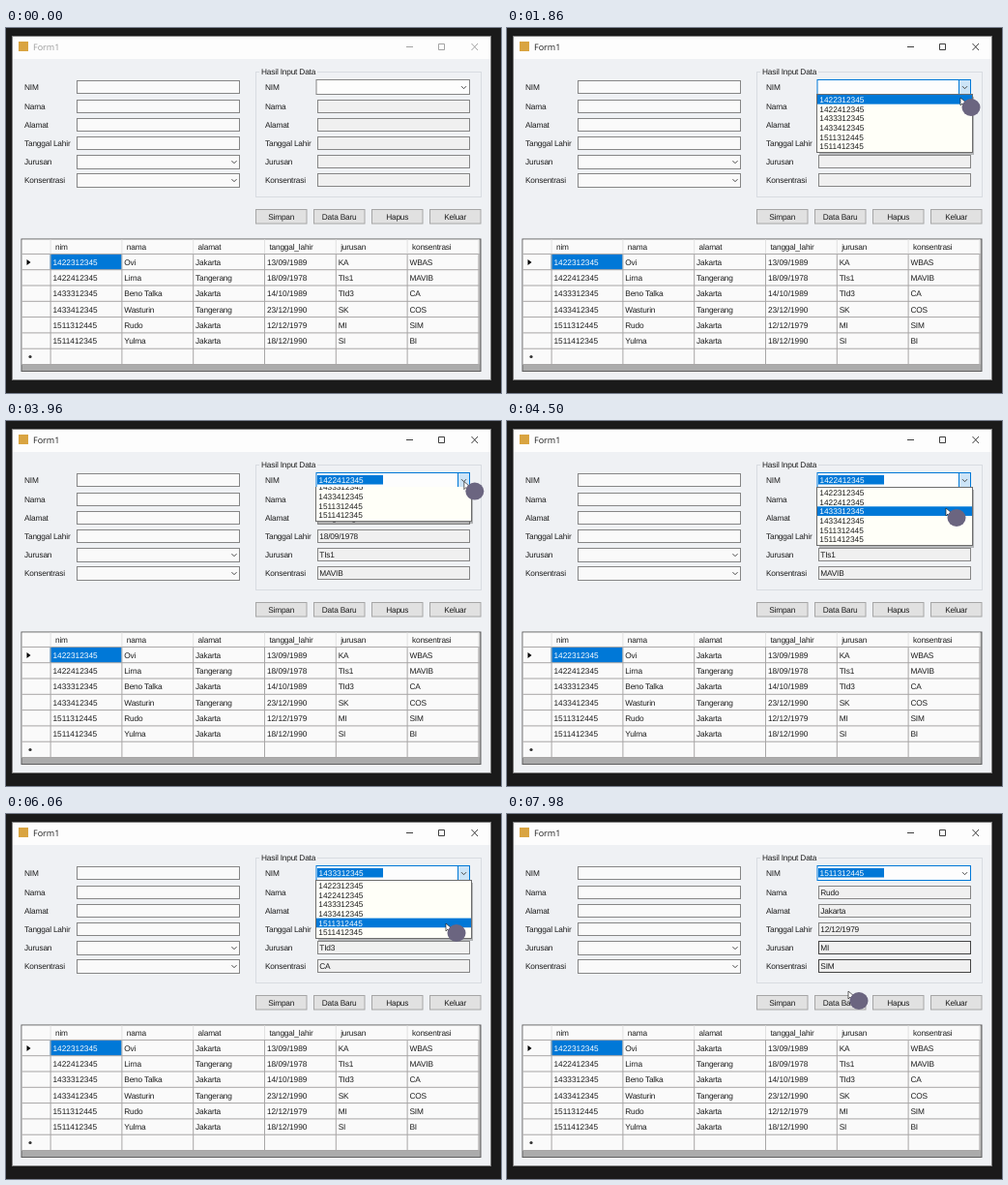
An HTML page for the animation above (8000 ms loop, 512x377 px).

```html
<!DOCTYPE html>
<html lang="id">
<head>
<meta charset="utf-8">
<title>Form1</title>
<style>
html, body { margin: 0; width: 100%; height: 100%; overflow: hidden; background: #1a1a1a; }
svg { display: block; width: 100%; height: 100%; }
text { font: 8.3px "Liberation Sans", Arial, sans-serif; fill: #1c1c1c; text-rendering: geometricPrecision; white-space: pre; }
.word { letter-spacing: -.18px; }
.title { font: 9px "Open Sans", "Noto Sans", sans-serif; }
.mid { text-anchor: middle; }
.line { fill: none; stroke: #444; }
.light { fill: #fff; }
#chrome { stroke: #2a2a2a; stroke-width: .9; fill: none; }
.idle #chrome { stroke: #999; }
.idle .title { fill: #999; }
</style>
</head>
<body>
<svg id="stage" viewBox="0 0 512 377" preserveAspectRatio="none"></svg>
<script>
const LOOP = 8000, TICK = 60;
const labels = ['NIM', 'Nama', 'Alamat', 'Tanggal Lahir', 'Jurusan', 'Konsentrasi'];
const heads = ['nim', 'nama', 'alamat', 'tanggal_lahir', 'jurusan', 'konsentrasi'];
const people = [
  ['1422312345', 'Ovi', 'Jakarta', '13/09/1989', 'KA', 'WBAS'],
  ['1422412345', 'Lirna', 'Tangerang', '18/09/1978', 'TIs1', 'MAVIB'],
  ['1433312345', 'Beno Talka', 'Jakarta', '14/10/1989', 'TId3', 'CA'],
  ['1433412345', 'Wasturin', 'Tangerang', '23/12/1990', 'SK', 'COS'],
  ['1511312445', 'Rudo', 'Jakarta', '12/12/1979', 'MI', 'SIM'],
  ['1511412345', 'Yulma', 'Jakarta', '18/12/1990', 'SI', 'BI']
];
const fieldY = [54, 74, 93, 112, 131, 150];
const colX = i => 45.6 + i * 73.8;
const rowY = i => 233.4 + i * 16.3;
const EDGE = '#868686', BLUE = '#0078d7', GRID = '#a8a6a6';
const LIST_TOP = 69, ITEM = 9.65, LIST_H = 60, OPEN_MS = 205;

// pointer tip: time, x, y
const path = [
  [180, 484, 26], [480, 312, 50], [840, 468, 61], [1020, 468, 61], [1320, 473, 62],
  [1620, 474, 63], [1800, 469, 72], [2220, 469, 72], [2520, 474, 61], [2760, 474, 61],
  [3120, 460, 83], [3240, 459, 84], [3420, 459, 84], [3720, 475, 61], [3900, 475, 61],
  [4320, 454, 90], [4560, 454, 90], [5100, 476, 62], [5600, 476, 62], [5880, 455, 113],
  [6060, 455, 113], [6360, 302, 80], [6720, 451, 101], [6840, 448, 104], [6900, 448, 104],
  [7260, 273, 120], [7560, 350, 150], [7680, 345, 150], [7980, 353, 183]
];
const opens = [[1440, 2280], [2700, 3480], [3840, 4560], [5400, 6120]];
const picks = [[2280, 0], [3480, 1], [4560, 2], [6120, 4]];
const hovers = [[6360, 6900, 1], [7320, LOOP, 4], [7500, LOOP, 5]];
const ACTIVE_AT = 1380;

const rect = (x, y, w, h, fill, more = '') =>
  `<rect x="${x}" y="${y}" width="${w}" height="${h}" fill="${fill}" ${more}/>`;
const box = (x, y, w, h, fill, edge, more = '') =>
  rect(x + .5, y + .5, w - 1, h - 1, fill, `stroke="${edge}" ${more}`);
const text = (x, y, s, cls = 'word', more = '') =>
  `<text x="${x}" y="${y}" class="${cls}" ${more}>${s}</text>`;
const chevron = (x, y) => `<path class="line" d="M${x - 2.5} ${y - 1.3}l2.5 2.5 2.5-2.5"/>`;

function drawWindow() {
  return rect(0, 0, 512, 377, '#1a1a1a') +
    box(6, 8, 496, 356, '#eff1f4', '#7c7c7c') + rect(7, 9, 494, 23, '#fdfdfd') +
    rect(13, 14, 10, 10, '#d9a441') + text(28, 23, 'Form1', 'title') +
    '<g id="chrome"><path d="M414 19.5h7M447.5 16.5h6v6h-6z"/>' +
    '<path d="M481.5 16l6.5 7m0-7l-6.5 7"/></g>';
}

function drawFields() {
  let out = box(258, 45, 234, 130, 'none', '#d8dce1') + rect(262, 43, 60, 5, '#eff1f4') +
    text(264, 47.8, 'Hasil Input Data');
  labels.forEach((name, i) => {
    const y = fieldY[i], combo = i > 3;
    out += text(19, y + 10.2, name) + box(73, y, 169, combo ? 15 : 14, '#fafafa', EDGE);
    if (combo) out += chevron(236, y + 7.5);
    out += text(268, y + 10.2, name);
    if (i) out += box(322, y, 158, 14, '#f0f0f0', EDGE, `id="box${i}"`) +
      text(324.3, y + 10.2, '', 'word', `id="val${i}"`);
  });
  return out + box(320.5, 53, 159.5, 16, '#fdfdfd', EDGE, 'id="combo"') +
    box(467, 53, 13, 16, '#cce4f7', BLUE, 'id="drop"') + chevron(473.5, 61.5) +
    rect(322, 56, 68, 9.5, BLUE, 'id="mark"') +
    text(323.6, 64, '', 'light', 'id="val0"');
}

function drawButtons() {
  return ['Simpan', 'Data Baru', 'Hapus', 'Keluar'].map((name, i) =>
    box(258 + i * 60, 187, 53.5, 15.5, '#e1e1e1', '#a6a6a6') +
    text(284.7 + i * 60, 198, name, 'word mid')).join('');
}

function drawGrid() {
  let out = box(15.5, 217.5, 476, 137.5, '#ababab', '#5f5f5f') +
    rect(16.5, 218.5, 473, 129, '#fafafa') +
    rect(colX(0), rowY(0), 74, 16.3, BLUE);
  for (let i = 0; i < 8; i++) out += rect(16.5, rowY(i) - .5, 473, 1, GRID);
  for (let c = 0; c < 7; c++) {
    out += rect(colX(c), 218.5, 1, 15, '#e2e2e2') + rect(colX(c), 233, 1, 114.5, GRID);
    if (c < 6) out += text(colX(c) + 5.4, 229.2, heads[c]);
  }
  people.forEach((row, r) => row.forEach((s, c) => {
    const cls = (c % 3 ? 'word' : '') + (r + c ? '' : ' light');
    out += text(colX(c) + 2.9, rowY(r) + 11.2, s, cls);
  }));
  return out + '<path d="M21.5 239l4 3-4 3z"/><circle cx="25" cy="339.5" r="1.6" fill="#333"/>';
}

function drawList() {
  const items = people.map((p, i) =>
    text(323.3, LIST_TOP + 8 + i * ITEM, p[0], '', `id="item${i}"`)).join('');
  return `<clipPath id="below"><rect x="318" y="${LIST_TOP - 1}" width="170" height="70"/></clipPath>` +
    '<g id="list" clip-path="url(#below)"><g id="slide">' +
    rect(323, LIST_TOP + 2, 160, LIST_H, '#000', 'opacity=".25"') +
    box(320, LIST_TOP - 1, 162, LIST_H + 1, '#fffff8', '#6d6d6d') +
    rect(321, LIST_TOP, 160, ITEM, BLUE, 'id="hot"') + items + '</g></g>';
}

function drawPointer() {
  return '<g id="pointer"><g id="arrow">' +
    '<path d="M0 0v8l2-2 1.5 3 1.5-1-1.5-2.500h3z" fill="#fff" stroke="#222" stroke-width=".7"/>' +
    '<ellipse cx="11" cy="10" rx="9.5" ry="9" fill="#6b6580"/></g>' +
    '<g id="beam"><path d="M-2.5-5h2l.5.5.5-.5h2M0-4.5v9M-2.5 5h2l.5-.5.5.5h2" fill="none" stroke="#888" stroke-width=".8"/>' +
    '<g fill="#8b459c"><path d="M11.5 7.500c2.5 0 5 3 5 5.500s-2.500 3-5 2.200c-2.500.8-5 .3-5-2.200s2.500-5.500 5-5.500z"/>' +
    '<ellipse cx="6" cy="8" rx="1.5" ry="2"/><ellipse cx="9.5" cy="4.5" rx="1.6" ry="2.2"/>' +
    '<ellipse cx="13.5" cy="4.5" rx="1.6" ry="2.2"/><ellipse cx="17" cy="8" rx="1.5" ry="2"/></g></g></g>';
}

const stage = document.getElementById('stage');
stage.innerHTML = drawWindow() + drawFields() + drawButtons() + drawGrid() + drawList() + drawPointer();
const $ = id => document.getElementById(id);
const show = (id, on) => $(id).setAttribute('visibility', on ? 'inherit' : 'hidden');

function pointAt(t) {
  const n = path.findIndex(p => p[0] > t);
  if (n < 0) return path[path.length - 1].slice(1);
  if (n === 0) return path[0].slice(1);
  const [t0, x0, y0] = path[n - 1], [t1, x1, y1] = path[n];
  const k = (t - t0) / (t1 - t0), e = k * k * (3 - 2 * k);
  return [x0 + (x1 - x0) * e, y0 + (y1 - y0) * e];
}

function overText(x, y) {
  if (x < 322 || x > 480) return false;
  return fieldY.some((top, i) => y >= top && y <= top + 14 && (i || x < 467));
}

function render(t) {
  const active = t >= ACTIVE_AT;
  const pick = picks.reduce((last, [at, row]) => t >= at ? row : last, -1);
  const span = opens.find(([a, b]) => t >= a && t < b);
  const [x, y] = pointAt(t);

  stage.classList.toggle('idle', !active);
  $('combo').setAttribute('stroke', active ? BLUE : EDGE);
  show('drop', span);
  show('mark', pick >= 0);
  for (let i = 0; i < 6; i++) {
    $('val' + i).textContent = pick < 0 ? '' : people[pick][i];
    if (i) {
      const dark = hovers.some(([a, b, f]) => f === i && t >= a && t < b);
      $('box' + i).setAttribute('stroke', dark ? '#444' : EDGE);
    }
  }

  show('list', span);
  show('hot', false);
  if (span) {
    const shown = Math.min(1, (t - span[0]) / OPEN_MS);
    $('slide').setAttribute('transform', `translate(0 ${(shown - 1) * LIST_H})`);
    const under = Math.floor((y - LIST_TOP) / ITEM);
    const hot = under >= 0 && under < 6 ? under : pick;
    show('hot', hot >= 0);
    $('hot').setAttribute('y', LIST_TOP + hot * ITEM);
    people.forEach((p, i) => $('item' + i).classList.toggle('light', i === hot));
  }

  const beam = !span && overText(x, y);
  show('pointer', t >= path[0][0]);
  show('arrow', !beam);
  show('beam', beam);
  $('pointer').setAttribute('transform', `translate(${x} ${y})`);
}

function loop() {
  const t = performance.now() % LOOP;
  render(Math.floor(t / TICK) * TICK);
  requestAnimationFrame(loop);
}
loop();
</script>
</body>
</html>
```
